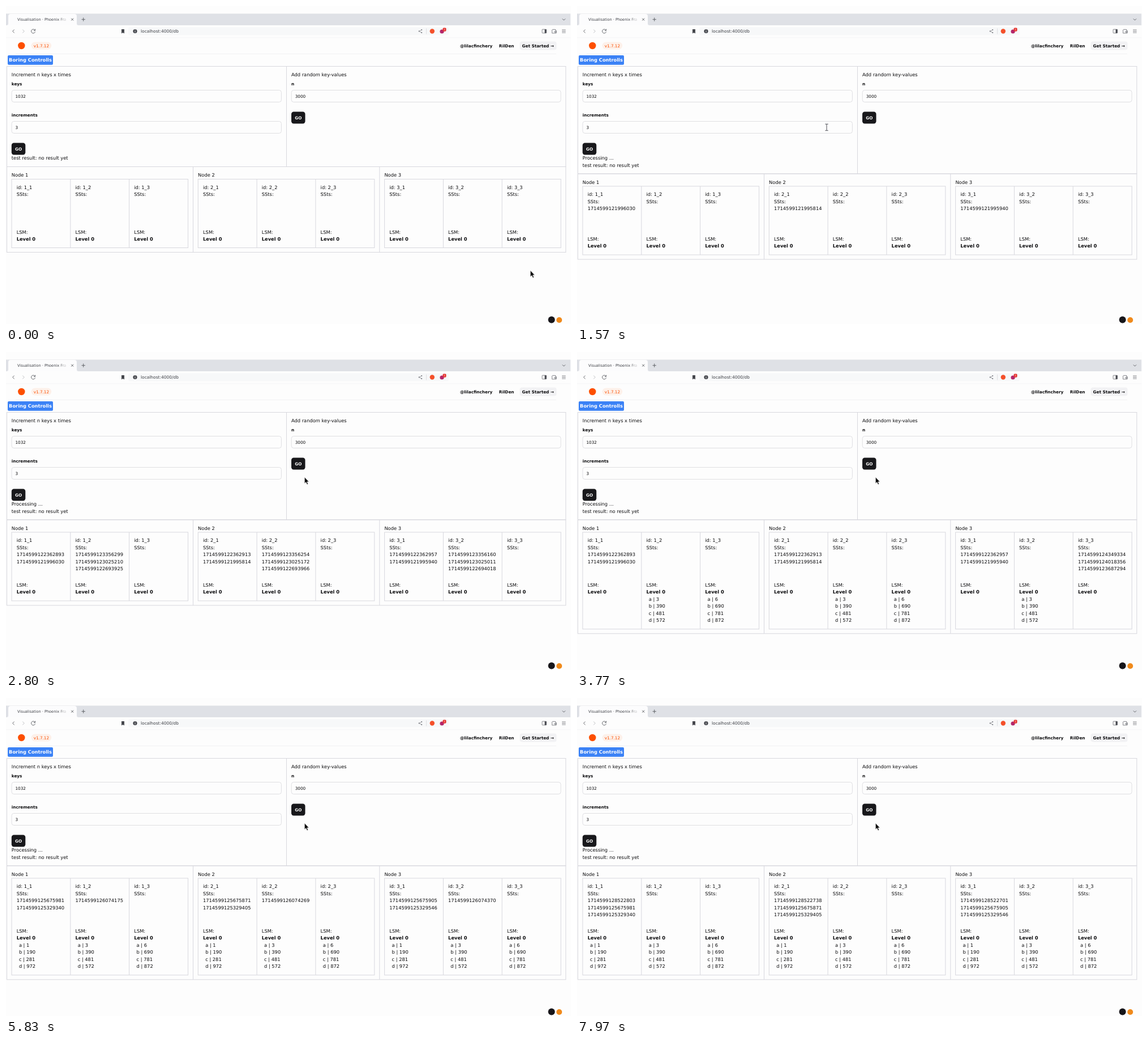
Animation, 998 px wide and 561 px high, one loop 8000 ms. Source, as an HTML page:

```html
<!DOCTYPE html>
<html lang="en">
<head>
<meta charset="utf-8">
<title>Visualisation</title>
<style>
  html, body { margin: 0; width: 100%; height: 100%; overflow: hidden; background: #fdfdfd; }
  svg { display: block; width: 998px; height: 561px; }
  text { font: 8.31px "DejaVu Sans", sans-serif; fill: #0c0c0e; text-rendering: geometricPrecision; white-space: pre; }
  .bold, .bold text { font-weight: 700; }
  .small { font-size: 7.27px; }
  .field { fill: #fdfdfd; stroke: #d8d8dc; stroke-width: .8; }
  .line { fill: none; stroke: #d8d8de; stroke-width: 1; }
  .icon { fill: none; stroke: #55575d; stroke-width: .9; }
</style>
</head>
<body>
<svg viewBox="0 0 998 561">
  <defs>
    <linearGradient id="fade" gradientUnits="userSpaceOnUse" x1="92" x2="109">
      <stop stop-color="#3c3e44"/><stop offset="1" stop-color="#3c3e44" stop-opacity="0"/>
    </linearGradient>
  </defs>

  <!-- Browser window -->
  <rect y="13.5" width="997" height="20.5" fill="#dfe1e6"/>
  <path d="M1 34q3 0 3-3V18q0-4 4-4H121q4 0 4 4V31q0 3 3 3Z" fill="#fcfcfd"/>
  <text x="20" y="26" style="font-size:6.6px;fill:url(#fade)">Visualisation · Phoenix Fra</text>
  <g class="icon">
    <path d="M115.2 21.7l4 4m0-4l-4 4M133.5 23.7h6.4m-3.2-3.2v6.4M982.8 22.5l2.6 2.6 2.6-2.6"/>
    <path d="M14.6 41.6l-2.9 2.9 2.9 2.9"/>
    <path d="M29.3 41.6l2.9 2.9-2.9 2.9" stroke="#b5b6ba"/>
    <path d="M51 42.6a3.5 3.5 0 1 0 .5 2.7M51.6 40.6v2.7h-2.7"/>
  </g>
  <path d="M204 41h5v7.6l-2.5-1.6-2.5 1.6Z" fill="#45474d"/>
  <rect x="216" y="37.5" width="566" height="14" rx="3" fill="#f7f8f9"/>
  <circle cx="228" cy="44.5" r="3.6" fill="#45474d"/>
  <path d="M228 44v2.5M228 42v1" stroke="#fff" stroke-width=".9"/>
  <text x="238" y="47.2" style="font-size:7.46px;fill:#3f4147">localhost:4000/db</text>
  <g class="icon" style="stroke-width:.7">
    <path d="M734 42.3l-4.5 2.2 4.5 2.2" stroke="#77797f"/>
    <path d="M742.5 39.5v10" stroke="#d5d6da"/>
    <rect x="947" y="41.2" width="7.4" height="6.6" rx=".8"/>
    <path d="M965 41.4h5.5v1.6h1.4v5h-7.4v-6M969 44.7h3v1.7h-3ZM982 42h6.6m-6.6 2.5h6.6m-6.6 2.5h6.6"/>
  </g>
  <g fill="#77797f">
    <circle cx="734.2" cy="42" r="1"/><circle cx="729.6" cy="44.5" r="1"/><circle cx="734.2" cy="47" r="1"/>
    <path d="M951.5 41.2h3v6.6h-3Z" fill="#45474d"/>
  </g>
  <circle cx="752.8" cy="44.5" r="4.2" fill="#f4502a"/>
  <circle cx="770" cy="45" r="3.6" fill="#b3276b"/>
  <rect x="771.5" y="38.5" width="6" height="6.2" rx="1.6" fill="#e5322d"/>
  <text x="774.5" y="43.4" text-anchor="middle" style="font-size:4.5px;fill:#fff">1</text>
  <path d="M0 56h997" stroke="#f0f0f2" stroke-width=".7"/>

  <!-- Page header -->
  <circle cx="27.3" cy="70" r="6.2" fill="#fd4f00"/>
  <rect x="44.6" y="63.5" width="35.6" height="13" rx="6.5" fill="#fdf1ea"/>
  <text class="small" x="48.7" y="72.8" style="fill:#fd4f00">v1.7.12</text>
  <rect x="907.5" y="62.5" width="65" height="15" rx="4" fill="#f2f2f4"/>
  <g class="bold">
    <text class="small" x="802" y="72.8">@lilacfinchery</text>
    <text class="small" x="870.8" y="72.8">RilDen</text>
    <text class="small" x="911.6" y="72.8">Get Started →</text>
  </g>
  <path d="M17 84.5H972" stroke="#efeff2" stroke-width=".8"/>
  <rect x="3" y="87" width="80" height="16.7" rx="2" fill="#3b82f6"/>
  <text class="bold" x="5.1" y="98.3" style="fill:#fff">Boring Controlls</text>

  <!-- Forms -->
  <text x="9.8" y="123.6">Increment n keys x times</text>
  <text x="504" y="123.6">Add random key-values</text>
  <g class="bold">
    <text class="small" x="9.8" y="140.4">keys</text>
    <text class="small" x="9.8" y="195.2">increments</text>
    <text class="small" x="504" y="140.4">n</text>
  </g>
  <rect class="field" x="10" y="148.5" width="476.4" height="21" rx="4"/>
  <rect class="field" x="10" y="203.5" width="476.4" height="21" rx="4"/>
  <rect class="field" x="504.2" y="148.5" width="475.8" height="21" rx="4"/>
  <text class="small" x="16.5" y="161.7">1032</text>
  <text class="small" x="16.5" y="216.7">3</text>
  <text class="small" x="510.7" y="161.7">3000</text>
  <g fill="#18181b">
    <rect id="go" x="9.8" y="241.6" width="24.5" height="20.8" rx="4.2"/>
    <rect x="504" y="186.6" width="24.5" height="20.8" rx="4.2"/>
  </g>
  <g class="bold">
    <text class="small" x="16" y="254.6" style="fill:#fff">GO</text>
    <text class="small" x="510.2" y="199.6" style="fill:#fff">GO</text>
  </g>

  <g id="state"></g>

  <!-- Dock -->
  <circle cx="963.6" cy="553.6" r="6" fill="#17161a"/>
  <circle cx="977.2" cy="554" r="5" fill="#f08a1c"/>

  <g id="cursor">
    <path id="arrow" d="M0 0V11.2L2.6 8.8 4.4 12.9 6.3 12.1 4.5 8.1H7.8Z" fill="#0a0a0a" stroke="#fff" stroke-width=".6"/>
    <path id="beam" d="M-2.6-5.6H-.6L0-5 .6-5.6H2.6M0-5V5M-2.6 5.6H-.6L0 5 .6 5.6H2.6" fill="none" stroke="#6a6b71" stroke-width="1.2"/>
    <path id="hand" d="M-1 0q1-1.2 2 0V4.2l4 .9q1 .4 .8 1.6L5 10.5H0L-3.4 6.5q.2-1.4 1.4-.7l1 .9Z" fill="#fff" stroke="#111" stroke-width=".8"/>
  </g>
</svg>

<script>
const LOOP = 8000, CLICK = 1000, LINE = 12.46;
const EPOCH = 1714599120600;  // wall clock in ms when the loop begins
const FLUSHES = 18, TICK = 375, NODE_LAG = 12;
const levels = ["1 190 281 972", "3 390 481 572", "6 690 781 872"];
// Flush index and time in ms; flushes between are evenly spaced.
const pace = [[0, 1395.8], [1, 1762.8], [7, 3749.3], [9, 4729.3], [10, 5075.8], [14, 6669.1], [16, 7340], [17, 7922.6]];
// Pointer moves: start, end, destination.
const home = [926.2, 466.6];
const moves = [[200, 800, 20, 250], [1120, 1480, 441, 214], [1690, 1860, 527.3, 220.8]];

const byId = id => document.getElementById(id);
const mix = (a, b, u) => a + (b - a) * u;
const label = (x, y, s, cls = "") => `<text class="${cls}" x="${x}" y="${y}">${s}</text>`;
const box = (x, y, w, h) => `<rect class="line" x="${x}" y="${y}" width="${w}" height="${h}"/>`;
const rule = (x, y, h) => `<path class="line" d="M${x} ${y}v${h}"/>`;

function noise(seed) {
  const v = Math.sin(seed * 12.9898) * 43758.5453;
  return v - Math.floor(v);
}

function flushTime(i, node) {
  const k = Math.max(1, pace.findIndex(p => p[0] >= i));
  const [i0, t0] = pace[k - 1], [i1, t1] = pace[k];
  return mix(t0, t1, (i - i0) / (i1 - i0)) + .25 * noise(i * 3 + node + 1);
}

// Each column collects three tables, then merges them on the next tick.
function columnState(node, col, t) {
  let tables = [], merged = false;
  for (let i = 0; i < FLUSHES; i++) {
    const at = flushTime(i, node);
    if (Math.floor((i + 1) / 3) % 3 !== col || at > t) continue;
    tables.unshift(EPOCH * 1000 + Math.round(at * 1000));
    if (tables.length === 3 && t >= Math.ceil(at / TICK) * TICK + node * NODE_LAG) {
      tables = [];
      merged = true;
    }
  }
  return { tables, merged };
}

function cell(x, name, { tables, merged }) {
  const rows = merged ? levels[name.col].split(" ") : [];
  return label(x, 322.8, `id: ${name.node + 1}_${name.col + 1}`) + label(x, 335.3, "SSts:")
    + tables.map((stamp, i) => label(x, 347.7 + i * LINE, stamp)).join("")
    + label(x, 401.6, "LSM:") + label(x, 414, "Level 0", "bold")
    + rows.map((v, i) => label(x + 4.2, 414 + (i + 1) * LINE, `${"abcd"[i]} | ${v}`)).join("");
}

function page(t) {
  const trio = [0, 1, 2];
  const states = trio.map(node => trio.map(col => columnState(node, col, t)));
  const shift = t >= CLICK ? LINE : 0;
  const grow = states.flat().some(s => s.merged) ? 4 * LINE : 0;
  let nodes = box(1.5, 283.5, 987.3, 151 + grow);
  for (const node of trio) {
    const x = 10 + node * 329.3;
    if (node) nodes += rule(x - 8.8, 283.5, 151 + grow);
    nodes += label(x - .2, 301.4, `Node ${node + 1}`) + box(x, 305.5, 311.5, 121 + grow);
    for (const col of trio) {
      const left = x + col * 103.8;
      if (col) nodes += rule(left, 305.5, 121 + grow);
      nodes += cell(left + 8.7, { node, col }, states[node][col]);
    }
  }
  return box(1.5, 106.5, 987.3, 177 + shift) + rule(495.5, 106.5, 177 + shift)
    + (shift ? label(9.8, 271.3, "Processing ...") : "")
    + label(9.8, 271.3 + shift, "test result: no result yet")
    + `<g transform="translate(0 ${shift})">${nodes}</g>`;
}

function pointer(t) {
  let [x, y] = home;
  for (const [from, to, endX, endY] of moves) {
    const u = Math.min(1, Math.max(0, (t - from) / (to - from)));
    const eased = u * u * (3 - 2 * u);
    x = mix(x, endX, eased);
    y = mix(y, endY, eased);
  }
  return [x, y];
}

const start = performance.now();
let shown = "";

function draw() {
  const t = (performance.now() - start) % LOOP;
  const html = page(t);
  if (html !== shown) byId("state").innerHTML = shown = html;

  const [x, y] = pointer(t);
  const onButton = x > 10 && x < 34 && y > 241 && y < 263;
  const onField = x > 10 && x < 486 && y > 203 && y < 225;
  const shape = onButton ? "hand" : onField ? "beam" : "arrow";
  for (const id of ["arrow", "beam", "hand"]) byId(id).style.display = id === shape ? "" : "none";
  byId("cursor").setAttribute("transform", `translate(${x} ${y})`);
  byId("go").setAttribute("fill", onButton ? "#3f3f46" : "#18181b");
  requestAnimationFrame(draw);
}
draw();
</script>
</body>
</html>
```
